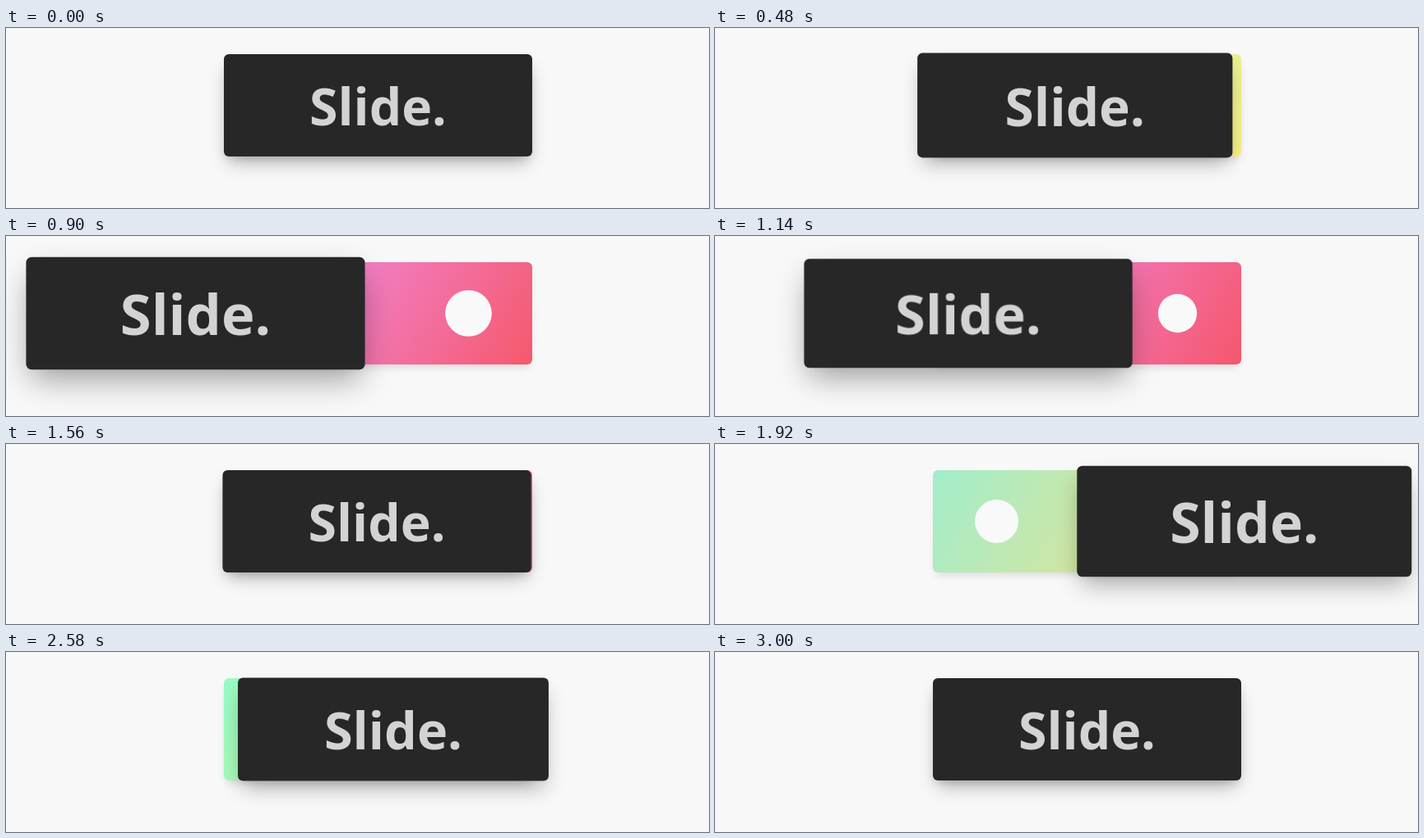
An HTML page that plays this animation: 855 by 220 pixels, repeating every 3.78 s.

```html
<!DOCTYPE html>
<html lang="en">
<head>
<meta charset="utf-8">
<title>Slide</title>
<style>
  html, body { margin: 0; width: 100%; height: 100%; overflow: hidden; background: #f8f8f8; }
  #item, #card { position: absolute; width: 375px; height: 125px; border-radius: 6px; }
  #item { left: 265px; top: 32px; box-shadow: 0 6px 12px -4px rgba(0, 0, 0, .15); }
  #bubble { position: absolute; top: 25px; width: 75px; height: 75px; border-radius: 50%; background: #f9f9f9; }
  #card {
    left: 0; top: 0; background: #272727; color: rgba(255, 255, 255, .8);
    font: 700 62.5px/125px "Open Sans", "Noto Sans", sans-serif;
    text-align: center; user-select: none; will-change: transform;
  }
</style>
</head>
<body>
<div id="item"><div id="bubble"></div><div id="card">Slide.</div></div>
<script>
const LOOP = 3780, STEP = 60, END = 3000;
const GREEN = [[150, 251, 196], [249, 245, 134]];
const PINK = [[240, 147, 251], [245, 87, 108]];

// One entry per drag: press, start of move, move duration, release, distance
const DRAGS = [
  { press: 417, move: 430, dur: 318, release: 1052, dist: -222, from: GREEN, to: PINK, tint: 458 },
  { press: 1677, move: 1680, dur: 334, release: 2280, dist: 237, from: PINK, to: GREEN, tint: 1670 }
];

const item = document.getElementById('item');
const bubble = document.getElementById('bubble');
const card = document.getElementById('card');

const clamp = (v, a = 0, b = 1) => Math.min(b, Math.max(a, v));
const mix = (a, b, k) => a + (b - a) * k;
const smooth = u => { u = clamp(u); return u * u * (3 - 2 * u); };

// Critically damped spring: remaining fraction after ms
function rest(ms) {
  const w = Math.max(0, ms) * 0.014;
  return (1 + w) * Math.exp(-w);
}

function shadow(k) {
  const y = mix(12, 16, k), blur = mix(22, 36, k), spread = mix(-6, -5, k);
  return `0 ${y}px ${blur}px ${spread}px rgba(0,0,0,${mix(.3, .38, k)})`;
}

function render(t) {
  const d = DRAGS[t < 1620 ? 0 : 1];
  const held = t < d.release;
  const back = rest(t - d.release);
  const done = t >= END;

  const x = done ? 0 : d.dist * smooth((t - d.move) / d.dur) * back;
  const lift = done ? 0 : (1 - rest(t - d.press)) * back;
  const lit = held ? smooth((t - d.press) / 600) : 1 - smooth((t - d.release) / 450);

  card.style.transform = `translateX(${x}px) scale(${1 + lift * .1})`;
  card.style.boxShadow = shadow(lit);

  const k = 1 - rest(t - d.tint);
  const [a, b] = d.from.map((c, i) => `rgb(${c.map((v, j) => Math.round(mix(v, d.to[i][j], k)))})`);
  item.style.background = `linear-gradient(120deg, ${a}, ${b})`;

  bubble.style.left = (d.dist < 0 ? 260 : 40) + 'px';
  bubble.style.transform = `scale(${clamp(.5 + (Math.abs(x) - 62.5) / 625, .5, 1)})`;
}

const start = performance.now();
function tick() {
  const t = (performance.now() - start) % LOOP;
  render(Math.floor(t / STEP) * STEP);
  requestAnimationFrame(tick);
}
tick();
</script>
</body>
</html>
```
